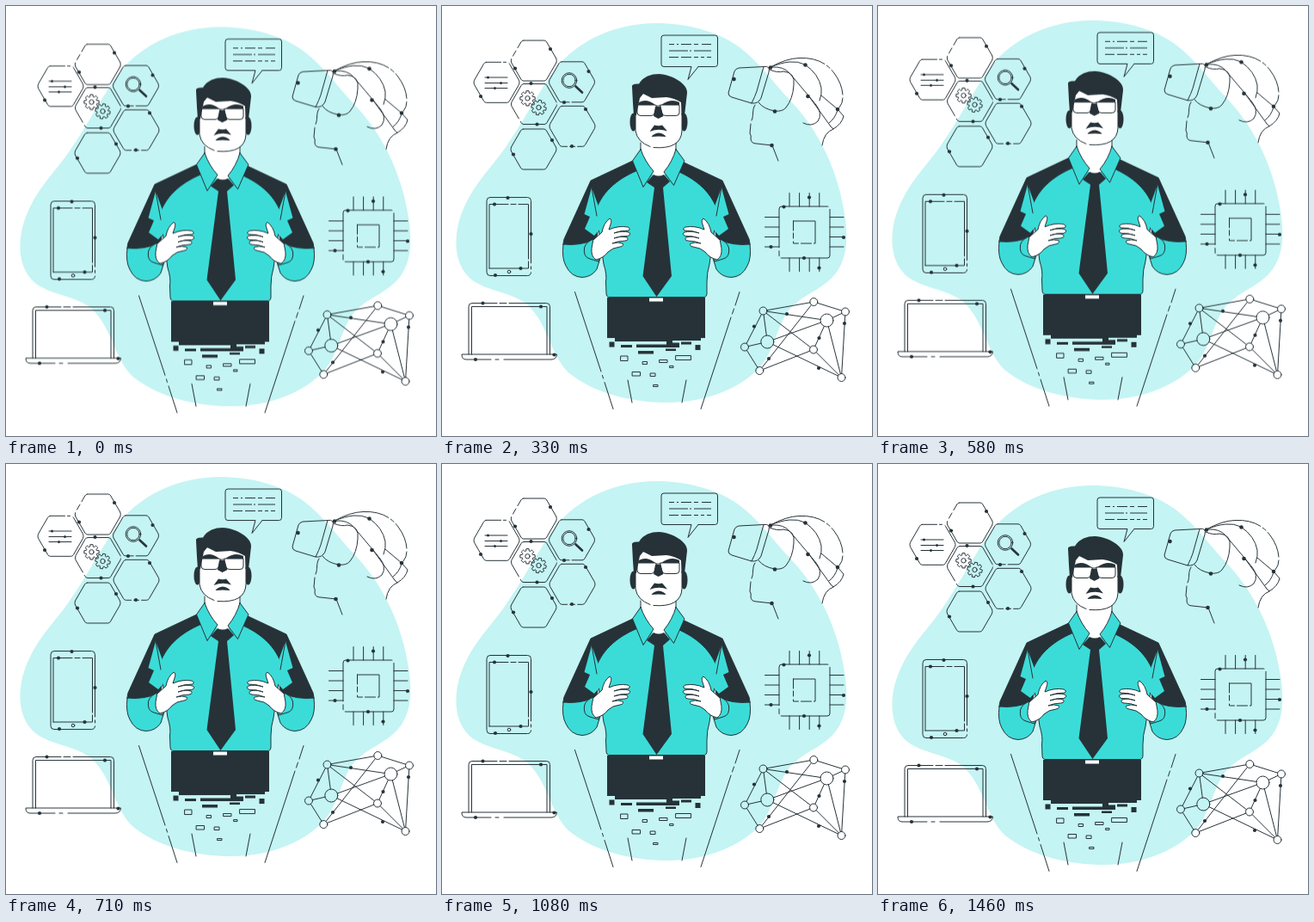
These frames come from a looping animation (500x500 px, 1.5 s). An HTML page:

```html
<!DOCTYPE html>
<html lang="en">
<head>
<meta charset="utf-8">
<title>Floating technology scene</title>
<style>
  html, body { margin: 0; width: 100%; height: 100%; overflow: hidden; background: #fff; }
  svg { display: block; width: 100%; height: 100%; }
  #scene { animation: float 1.5s linear -42ms infinite; }
  @keyframes float { 50% { transform: translateY(-10px); } }
  .line { fill: none; stroke: #263238; stroke-width: 1; stroke-linecap: round; stroke-linejoin: round; }
  .dark { fill: #263238; }
  .aqua { fill: #3bdcd8; }
  .skin { fill: #fff; }
  .edge { stroke: #263238; stroke-width: 1; stroke-linejoin: round; stroke-linecap: round; }
</style>
</head>
<body>
<svg viewBox="0 0 500 500">
<g id="scene">
  <path fill="#c4f4f3" d="M248 25C286 25 322 35 346 53C370 71 384 93 405 115C433 144 453 182 463 222C470 252 476 287 461 311C450 330 428 337 412 350C394 364 391 388 380 409C364 443 314 466 262 466C222 466 178 456 148 432C126 412 124 374 98 351C76 335 40 336 26 314C12 294 14 262 28 234C40 208 64 186 80 160C100 130 112 105 132 78C158 44 204 25 248 25Z"/>

  <g id="hexes" class="line"></g>
  <g class="line">
    <path d="M50 88H76M50 94.500H76M50 100.500H76"/>
    <circle cx="148" cy="91.500" r="8.800"/>
    <circle cx="148" cy="91.500" r="7.200"/>
    <path stroke-width="2.600" d="M155.500 98.500L163 105.500"/>
    <g id="gears"></g>
  </g>

  <g class="line">
    <path d="M298 75.500H317.500Q320.500 75.500 320.500 72.500V42Q320.500 39 317.500 39H258Q255 39 255 42V72.500Q255 75.500 258 75.500H290L286 90.500L298 75.500"/>
    <path stroke-linecap="butt" d="M264 49.500H270M273 49.500H275M278 49.500H290M293 49.500H298M302 49.500H313M264 57H286M288 57H290M293 57H313M264 64.500H275M278 64.500H290M293 64.500H298M301 64.500H305M308 64.500H313"/>
  </g>

  <g class="line">
    <path d="M374 75.500L345 77Q341 78 340 81L333 106Q333 110 337 111L360 118Q364 110 366 104L374 75.500Q382 74 380 82L371 112Q368 119 360 118"/>
    <path d="M381 79Q390 83 397 81Q411 82 409 97Q408 113 400 123Q396 128 387 127Q374 125 368 117"/>
    <path d="M382 76Q400 66 415 65.500Q442 64 456 83Q465 95 466 108" stroke-dasharray="66 3 5 3 60"/>
    <path d="M466 112Q466 118 462 123M382 76Q394 71 404 70Q414 69 422 73Q438 84 441 100Q442 107 439 115M384 76Q397 75 404 83L426 109L452 145"/>
    <path d="M426 109L435 120M441 109L460 125L467 133Q465 142 455 148L451 144M435 120Q443 130 437 139Q430 146 420 141M455 148Q444 152 442 167M450 141Q457 136 460 126"/>
    <path d="M364 120C360 126 363 132 360 138M359 142L358 153Q360 156 359 159Q359 165 366 165L384 167L391 185"/>
  </g>

  <g class="line">
    <rect x="52" y="227.500" width="51.500" height="91" rx="4" stroke-dasharray="122 4 3 4 600"/>
    <path d="M55 310V235.500H77M80 235.500H86M89 235.500H100.500V299M100.500 302V310H55"/>
    <circle cx="78" cy="314" r="1.800"/>
  </g>

  <g class="line">
    <path d="M31 410V354.500Q31 350.500 35 350.500H64M67 350.500H75M78 350.500H121.500Q125.500 350.500 125.500 354.500V410"/>
    <path d="M34.500 410V354.500H122V410"/>
    <path d="M57 416H28Q23 416 23 410H133.500Q133 416 127 416H72M62 416H66"/>
  </g>

  <g class="line">
    <rect x="392" y="238" width="59" height="60" rx="3" stroke-dasharray="54 4 112 3 6 4 300"/>
    <rect x="408.500" y="255" width="25.500" height="26" stroke-dasharray="53 3 12 3 8 4 6 3 60"/>
    <path id="pins"/>
  </g>

  <g id="net" class="line"></g>

  <g class="line">
    <path d="M154.500 337.500L185 430M186.500 434.500L187.500 438M189 442.500L199 473.500M216 440L221 466M284 440L279 466M346 337.500L341 353M339.500 357L337.500 363M336 367L301 473.500"/>
  </g>

  <!-- figure -->
  <defs>
    <g id="arm">
      <path class="dark edge" d="M226 183L173 208L142 276Q141 280 141 283L178 284L186 240L232 200Z"/>
      <path class="aqua edge" d="M141 282Q139 298 144 307Q150 320 163 320.500Q174 320 180 311L184 298L176 277Q160 284 141 282Z"/>
    </g>
    <g id="spike">
      <path class="aqua" d="M174 216L165.500 247L172 250L166 264L177 272L186 262L182 238Z"/>
      <path class="line" d="M174 216L180 249"/>
    </g>
    <g id="hand">
      <path class="aqua edge" d="M177 276Q168 278 165.500 286Q164 297 172 299L182 302Z"/>
      <path class="skin edge" d="M176 277L186 268Q188 257 195 252Q198 253 196 259L194 265Q205 260 216 262Q220 264 217 266Q207 266 200 269Q210 266 217 268Q221 270 216 272.500Q208 272 200 275Q209 272 215 274Q218 277 213 278Q205 278 198 281Q205 279 210 281Q212 284 207 285Q198 286 193 291Q188 298 179 300Q173 296 174 287Z"/>
    </g>
  </defs>

  <use href="#arm"/>
  <use href="#arm" transform="matrix(-1 0 0 1 499 0)"/>
  <path class="aqua edge" d="M230 195C207 204 187 219 179 242L188 305Q192 317 190.500 326L191 339Q191 343.500 195 343.500H304Q308 343.500 308 339L308 326Q308 315 311 305L320 242C312 219 292 204 269 195Z"/>
  <use href="#spike"/>
  <use href="#spike" transform="matrix(-1 0 0 1 499 0)"/>
  <use href="#hand"/>
  <use href="#hand" transform="matrix(-1 0 0 1 499 0)"/>

  <path class="skin" d="M231 160H272V178L258 203H246L231 178Z"/>
  <path class="line" d="M231 164V178M272 164V178"/>
  <path class="dark" d="M238 210L246 201Q252 204 258 201L265 209L257 216L267 319L249.500 343L233.500 319L247 216Z"/>
  <path class="aqua edge" d="M231 171.500L221.500 185L234 215.500L246 197Q236 186 231 171.500ZM272 171.500L282 185L269.500 213.500L258 198Q268 186 272 171.500Z"/>

  <ellipse class="dark" cx="222.500" cy="140" rx="4" ry="10.500"/>
  <ellipse class="dark" cx="281.500" cy="140" rx="4" ry="10.500"/>
  <path class="skin" d="M225 108H279V152Q276 165 262 169Q250 172 239 167Q227 162 225 150Z"/>
  <path class="line" d="M225 130V150Q227 163 242 168.500M246 169.500Q278 172 279 150V130"/>
  <path class="dark" d="M223 132L222 118L221 99Q220 95 229 95.500C234 87 243 84 252 84C269 85 286 96 285 106L282 132H278.500L278 117Q270 112 261 111L244 112L234 107L230 112L226 132Z"/>
  <path class="dark" d="M229 117Q238 112 248 120H228ZM276 117Q266 112 255 120H276ZM248 122H254L257.500 133L251.500 136L246 133Z"/>
  <path class="line" d="M227 120H248Q250 120 249 124L247 130Q246 132.500 243 132.500H231Q227 132.500 227 129ZM254 120H276V129Q276 132.500 272 132.500H260Q257 132.500 256 130ZM249 121H254"/>
  <path class="dark" d="M241.500 151L247 143.500Q252 145 256 143.500L262 150.500Q252 147 241.500 151ZM243.500 157Q246 153 252 152.500Q258 153 260.500 157Q252 156 243.500 157Z"/>

  <!-- trousers and fragments -->
  <path class="dark" d="M192 344H306V391H301V394H266V395H201V391H192Z"/>
  <path class="skin" d="M241 344.500H257V348.500H241Z"/>
  <path class="dark" d="M194.500 395.500h6v6h-6zM208 399h13v3h-13zM226 398.500h35v-5h7v3h8v5.500h-50zM228 406h18v3.500h-18zM260 403.500h12v2.500h-12zM278 395.500h12v3h-12zM294.500 399h6v6h-6z"/>
  <path class="line" d="M208 412h8v5.500h-8zM233.500 418.500h5v3h-5zM253 416.500h9v3h-9zM265 423.500h4v2h-4zM272 411.500h17.500v5h-17.500zM221.500 430.500h9v4.500h-9zM242.500 432h5.500v3.500h-5.500zM246 445.500h5v2h-5z"/>

  <g id="dots" class="dark"></g>
</g>
</svg>
<script>
  const $ = id => document.getElementById(id);

  function add(parent, tag, attrs) {
    const el = document.createElementNS('http://www.w3.org/2000/svg', tag);
    for (const k in attrs) el.setAttribute(k, attrs[k]);
    $(parent).appendChild(el);
  }

  // Rounded hexagons: centre and dash pattern, clockwise from the top left
  const hex = 'm-12 -23.500h24q2 0 3 2l11 19q1 2.500 0 5l-11 19q-1 2 -3 2h-24q-2 0 -3 -2l-11 -19q-1 -2.500 0 -5l11 -19q1 -2 3 -2';
  [
    [106.8, 68.5, '134 4 7 4 200'],
    [63.5, 93.8, '17 3 3 4 200'],
    [151, 93.3, '92 3 200'],
    [107, 119, '50 3 56 4 200'],
    [151.5, 144.8, '86 3 6 3 200'],
    [106.5, 171.5, '200 0']
  ].forEach(([x, y, dash]) => add('hexes', 'path', { d: `M${x} ${y}${hex}`, 'stroke-dasharray': dash }));

  // Gears with eight teeth
  function gear(cx, cy, turn) {
    const pts = [];
    for (let i = 0; i < 8; i++) {
      [[-.3, 6.4], [-.18, 8.8], [.18, 8.8], [.3, 6.4]].forEach(([da, r]) => {
        const a = i * Math.PI / 4 + turn + da;
        pts.push(`${cx + r * Math.cos(a)} ${cy + r * Math.sin(a)}`);
      });
    }
    add('gears', 'polygon', { points: pts.join(' ') });
    add('gears', 'circle', { cx, cy, r: 2.7 });
  }
  gear(99.5, 112.3, 0);
  gear(112.5, 123, .2);

  // Chip pins
  let pins = '';
  for (let i = 0; i < 4; i++) {
    const x = 404 + i * 11.6, y = 250.5 + i * 11.5;
    pins += `M${x} 222.500V238M${x} 298V313.500M375.500 ${y}H392M451 ${y}H467`;
  }
  $('pins').setAttribute('d', pins);

  // Network: each link stops at the rim of its nodes
  const nodes = {
    a: [373.5, 359.5, 4.5], b: [432.3, 349, 4.5], c: [469, 360.5, 4.5],
    d: [447.5, 370.5, 7.5], e: [352, 401.5, 4.5], f: [378.3, 395.5, 7.5],
    g: [432, 404.5, 4.5], h: [369.3, 429, 4.5], i: [464.5, 437, 4.5]
  };
  'ab ad ae af ag bc bh cd ci df dg di ef eh fi gi gh'.split(' ').forEach(([m, n]) => {
    const [x1, y1, r1] = nodes[m], [x2, y2, r2] = nodes[n];
    const len = Math.hypot(x2 - x1, y2 - y1), ux = (x2 - x1) / len, uy = (y2 - y1) / len;
    add('net', 'path', { d: `M${x1 + ux * r1} ${y1 + uy * r1}L${x2 - ux * r2} ${y2 - uy * r2}` });
  });
  for (const k in nodes) {
    const [cx, cy, r] = nodes[k];
    add('net', 'circle', { cx, cy, r });
  }

  // Accent dots
  function dots(r, list) {
    list.split(' ').forEach(p => {
      const [cx, cy] = p.split(',');
      add('dots', 'circle', { cx, cy, r });
    });
  }
  dots(1.5, '53.5,88 68.5,94.5 61.5,100.5');
  dots(2.1, '126,55 85,77.5 45,110 170.5,81 142,117 103.5,95 110.5,142.5 167,125 151,168 128,161 83,177.5');
  dots(2.3, '339.5,90 382,76.5 422.5,73.5 425.5,110 460,125 387,127.5 383.5,167');
  dots(2.1, '76.5,228 61,235.5 103.5,270 91.5,310 62,318');
  dots(2.1, '47.5,350.5 115,354.5 130.5,410.5 39,416');
  dots(2.1, '427,227.5 397.5,238.5 467,274 382.5,285 421,298 438.5,309.5');
  dots(2.1, '363,377.5 401,363 468,374 438.5,391 380,415 438,426');
</script>
</body>
</html>
```
